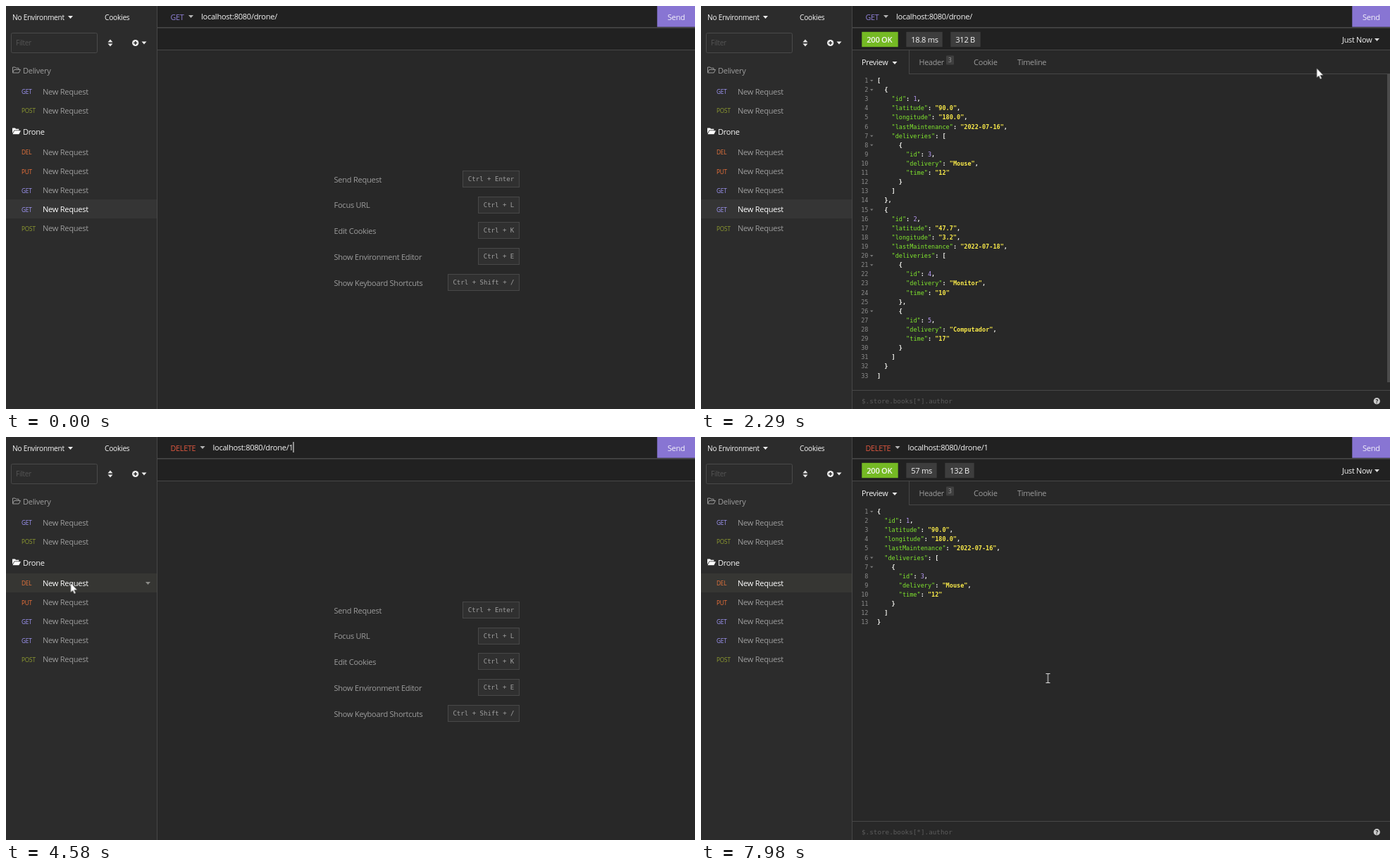
An HTML page for the animation above (8000 ms loop, 978x573 px).

```html
<!DOCTYPE html>
<html lang="en">
<head>
<meta charset="utf-8">
<title>API client</title>
<style>
html, body { margin: 0; width: 100%; height: 100%; overflow: hidden; background: #282828; }
svg { display: block; width: 978px; height: 573px; }
text { font: 11.1px "Open Sans", "Noto Sans", sans-serif; letter-spacing: -.025em; fill: #9c9c9c; }
text.white { fill: #f5f5f5; }
text.small { font-size: 8.3px; }
text.env { font-size: 10.2px; }
text.key { font: 9.05px "DejaVu Sans Mono", monospace; letter-spacing: 0; text-anchor: middle; fill: #a0a0a0; }
text.code { font: bold 8.54px "DejaVu Sans Mono", monospace; letter-spacing: 0; fill: #f4f4f0; }
text.num { font-weight: 400; fill: #8a8a8a; text-anchor: end; }
text.path { font: 9.3px "DejaVu Sans Mono", monospace; letter-spacing: 0; fill: #5c5c5c; }
.k { fill: #80e62e; font-weight: 400; }
.s { fill: #fcec4a; }
.n { fill: #b79af5; font-weight: 400; }
.line { fill: #474747; }

/* 1% of the loop is 80 ms */
.step { animation: 8s step-end infinite; visibility: hidden; }
.get { animation-name: get; }
.del { animation-name: del; }
.hints { animation-name: hints; }
.list { animation-name: list; }
.item { animation-name: item; }
.more { animation-name: more; }
.caret { animation-name: caret; }
.arrow { animation-name: arrow; }
.hand { animation-name: hand; }
.beam { animation-name: beam; }
#send { animation: send 8s step-end infinite; }
#sendText { animation: sendText 8s step-end infinite; }
text.wasOn { animation: textOff 8s step-end infinite; }
text.nowOn { animation: textOn 8s step-end infinite; }
#pointer { animation: move 8s linear infinite; }

@keyframes get { 0% { visibility: visible } 54.125%, to { visibility: hidden } }
@keyframes del { 0% { visibility: hidden } 54.125%, to { visibility: visible } }
@keyframes hints { 0%, 54.125% { visibility: visible } 19%, 77.5%, to { visibility: hidden } }
@keyframes list { 0%, 54.125%, to { visibility: hidden } 19.25% { visibility: visible } }
@keyframes item { 0% { visibility: hidden } 77.5%, to { visibility: visible } }
@keyframes more { 0%, 60%, to { visibility: hidden } 54.125% { visibility: visible } }
@keyframes caret { 0%, 64.125%, 76.625%, to { visibility: hidden } 54.5%, 70.375% { visibility: visible } }
@keyframes arrow { 0%, 14.6%, 28.95%, 68.75%, 92%, to { visibility: hidden } 9%, 26.2%, 43.1%, 89.95% { visibility: visible } }
@keyframes hand { 0%, 26.2%, 89.95%, to { visibility: hidden } 14.6%, 68.75% { visibility: visible } }
@keyframes beam { 0%, 43.1% { visibility: hidden } 28.95%, 92%, to { visibility: visible } }
@keyframes send { 0%, 26.2%, 89.95%, to { fill: #8875d3 } 14.6%, 68.75% { fill: #705eac } }
@keyframes sendText { 0%, 26.2%, 89.95%, to { fill: #f2f0fa } 14.6%, 68.75% { fill: #c9c1de } }
@keyframes textOff { 0% { fill: #fff } 54.125%, to { fill: #9c9c9c } }
@keyframes textOn { 0% { fill: #9c9c9c } 54.125%, to { fill: #fff } }
@keyframes move {
  0%, 9% { transform: translate(984px, 170px); animation-timing-function: ease-out }
  15.625%, 17.125% { transform: translate(961px, 17px) }
  19% { transform: translate(960px, 18px) }
  24.75% { transform: translate(960px, 18px); animation-timing-function: ease-in }
  28.625% { transform: translate(875px, 88px); animation-timing-function: ease-out }
  34.625% { transform: translate(504.5px, 358.5px) }
  37.5% { transform: translate(504.5px, 358.5px); animation-timing-function: ease-in }
  41.5% { transform: translate(258px, 276px); animation-timing-function: ease-out }
  46.5% { transform: translate(112px, 213px) }
  47.75% { transform: translate(112px, 213px); animation-timing-function: ease-in-out }
  50.875% { transform: translate(91.5px, 208px) }
  59.375% { transform: translate(91.5px, 208px); animation-timing-function: ease-in-out }
  69.125% { transform: translate(953px, 22px) }
  88.75% { transform: translate(953px, 22px); animation-timing-function: ease-in-out }
  98.75% { transform: translate(517px, 337px) }
  99.75%, to { transform: translate(492.5px, 343px) }
}
</style>
</head>
<body>
<svg viewBox="0 0 978 573" xmlns="http://www.w3.org/2000/svg">
  <defs>
    <path id="down" d="M0 0h7l-3.5 4z"/>
  </defs>

  <!-- sidebar -->
  <rect width="214" height="573" fill="#2c2c2c"/>
  <rect class="step get" y="275" width="214" height="27" fill="#353535"/>
  <rect class="step del" y="194" width="214" height="27" fill="#363633"/>
  <text class="white env" x="9" y="19.7">No Environment</text>
  <use href="#down" x="88" y="14" fill="#eee"/>
  <text class="white env" x="140" y="19.7">Cookies</text>
  <rect x="7.5" y="38.5" width="122" height="28" rx="2" fill="none" stroke="#4a4a4a"/>
  <text x="14" y="56.3" style="font-size:10px;fill:#555">Filter</text>
  <path d="M144.500 51.500h7l-3.500-4zM144.500 53.500h7l-3.500 4z" fill="#e8e8e8"/>
  <circle cx="183.700" cy="52.500" r="4.600" fill="#eee"/>
  <path d="M181.200 52.500h5M183.700 50v5" stroke="#2c2c2c" stroke-width="1.500"/>
  <use href="#down" x="192.500" y="50.500" fill="#eee"/>
  <path d="M9.500 94.500v-7.500h3.500l1 1.300h4v2M9.500 95l2.200-4.500h8.800l-2.300 4.500z" fill="none" stroke="#999"/>
  <text x="24" y="95.500">Delivery</text>
  <path d="M9 181v-7.500h4l1 1.300h4.300v1.800h-6.600zM9.500 182.300l2.500-5h9l-2.600 5z" fill="#fff"/>
  <text class="white" x="24" y="182.500">Drone</text>
  <g id="rows"></g>
  <use class="step more" href="#down" x="198" y="206" fill="#8c8c88"/>
  <rect class="line" x="214" width="1" height="573"/>

  <!-- address and status bars -->
  <rect x="215" width="763" height="63" fill="#212121"/>
  <rect class="line" x="215" y="30" width="763" height="1.600"/>
  <rect class="line" x="215" y="62" width="763" height="1"/>
  <g class="step get">
    <text x="233.500" y="19.500" style="font-size:10.8px;fill:#8f80d6">GET</text>
    <use href="#down" x="259" y="13" fill="#b5b5b5"/>
    <text class="white" x="277" y="18.800">localhost:8080/drone/</text>
  </g>
  <g class="step del">
    <text x="233.500" y="19.500" style="font-size:10.8px;fill:#e0573f">DELETE</text>
    <use href="#down" x="275.500" y="13" fill="#b5b5b5"/>
    <text class="white" x="293.500" y="18.800">localhost:8080/drone/1</text>
  </g>
  <rect class="step caret" x="407.500" y="7" width="1" height="15" fill="#fff"/>
  <rect id="send" x="924.300" width="54" height="29.700"/>
  <text id="sendText" x="939" y="19.500">Send</text>

  <g id="hints" class="step hints"></g>
  <g id="list" class="step list"></g>
  <g id="item" class="step item"></g>

  <g id="pointer">
    <path class="step arrow" d="M.3-.5v13.500l3-2.800 2 4.700 2.100-.9-2-4.600h4.200z" fill="#fff" stroke="#222" stroke-width=".4"/>
    <path class="step hand" d="M-1.500 1q1.500-2 3 0v6q3-1 3.500 1 2.500-.5 3 1.500v4l-1.500 5h-7l-3.500-5.500q-1.500-3 .5-3l2 1.500z" fill="#fff" stroke="#333" stroke-width=".8"/>
    <path class="step beam" d="M-3 -6.500h2.300l.7.700.7-.7h2.300M0-6v12M-3 6.500h2.300l.7-.7.7.7h2.300" fill="none" stroke="#ddd" stroke-width="1.100"/>
  </g>
</svg>
<script>
const $ = id => document.getElementById(id);
const text = (x, y, str, cls = '', style = '') =>
  `<text x="${x}" y="${y}" class="${cls}" style="${style}">${str}</text>`;
const rect = (x, y, w, h, fill, extra = '') =>
  `<rect x="${x}" y="${y}" width="${w}" height="${h}" fill="${fill}" ${extra}/>`;

const methodColor = { GET: '#a097f8', POST: '#8f9c30', DEL: '#e8743c', PUT: '#f0723a' };
const rows = [
  ['GET', 121.5], ['POST', 148.7], ['DEL', 207.7, 'nowOn'], ['PUT', 235],
  ['GET', 262], ['GET', 289.3, 'wasOn'], ['POST', 316]
];
$('rows').innerHTML = rows.map(([method, y, cls]) =>
  text(22, y + 3.7, method, 'small', 'fill:' + methodColor[method]) +
  text(52, y + 4, 'New Request', cls)).join('');

const hints = [
  ['Send Request', 'Ctrl + Enter', 648], ['Focus URL', 'Ctrl + L', 670],
  ['Edit Cookies', 'Ctrl + K', 670], ['Show Environment Editor', 'Ctrl + E', 670],
  ['Show Keyboard Shortcuts', 'Ctrl + Shift + /', 627]
];
$('hints').innerHTML = hints.map(([label, keys, x], i) => {
  const y = 245.8 + i * 36.75;
  return text(465.5, y + 4.8, label) +
    rect(x + .5, Math.round(y - 12) + .5, 728 - x, 23, '#303030', 'stroke="#484848"') +
    text((x + 729) / 2, y + 3, keys, 'key');
}).join('');

const paint = line => line.trim()
  .replace(/"[^"]*"(:?)|\b\d+\b/g, (m, colon) =>
    m[0] !== '"' ? `<tspan class="n">${m}</tspan>`
    : colon ? `<tspan class="k">${m.slice(0, -1)}</tspan>:`
    : `<tspan class="s">${m}</tspan>`);

function code(data) {
  return JSON.stringify(data, null, 2).split('\n').map((line, i) => {
    const y = 106 + i * 13.11;
    const fold = /[[{]$/.test(line)
      ? `<path d="M240 ${y - 1}h4.500l-2.250 2.600z" fill="#777"/>` : '';
    return text(237.5, y + 3, i + 1, 'code num') + fold +
      text(250 + line.search(/\S/) * 5.14, y + 3, paint(line), 'code');
  }).join('');
}

const badge = (x, w, str, fill = '#3d3d3d', style = '') =>
  rect(x + .3, 36.8, w - .6, 21.4, fill) + text(x + 7.3, 51.8, str, 'white', style);

function response(data, time, timeW, size, sizeW) {
  return badge(228, 52, '200 OK', '#75ba24', 'font-weight:600') +
    badge(291, timeW, time) + badge(302 + timeW, sizeW, size) +
    text(910, 51.5, 'Just Now', 'white', 'font-size:10.9px') +
    '<use href="#down" x="956" y="46" fill="#ddd"/>' +
    text(228, 84.3, 'Preview', 'white', 'font-size:10.9px') +
    '<use href="#down" x="271.5" y="79" fill="#eee"/>' +
    text(309.5, 84.3, 'Header', '', 'font-size:10.8px') +
    rect(348, 70.5, 11, 13, '#3f3f3f', 'rx="1"') + text(351, 80, 3, 'small') +
    text(387, 84.3, 'Cookie') + text(449, 84.3, 'Timeline', '', 'font-size:10.9px') +
    rect(295, 63, 1, 34, '#474747') + rect(295, 96, 683, 1, '#474747') +
    code(data) +
    rect(215, 546, 763, 1, '#474747') +
    text(228, 564.5, '$.store.books[*].author', 'path') +
    '<circle cx="959.3" cy="561.7" r="4.6" fill="#ccc"/>' +
    text(957.4, 564.7, '?', '', 'font-size:8px;font-weight:700;fill:#282828');
}

const job = (id, delivery, time) => ({ id, delivery, time });
const drone = (id, latitude, longitude, lastMaintenance, ...deliveries) =>
  ({ id, latitude, longitude, lastMaintenance, deliveries });
const first = drone(1, '90.0', '180.0', '2022-07-16', job(3, 'Mouse', '12'));
const second = drone(2, '47.7', '3.2', '2022-07-18',
  job(4, 'Monitor', '10'), job(5, 'Computador', '17'));

$('list').innerHTML = response([first, second], '18.8 ms', 52, '312 B', 43) +
  rect(974, 97, 4, 438, '#4b4b4b');
$('item').innerHTML = response(first, '57 ms', 44, '132 B', 42);
</script>
</body>
</html>
```
